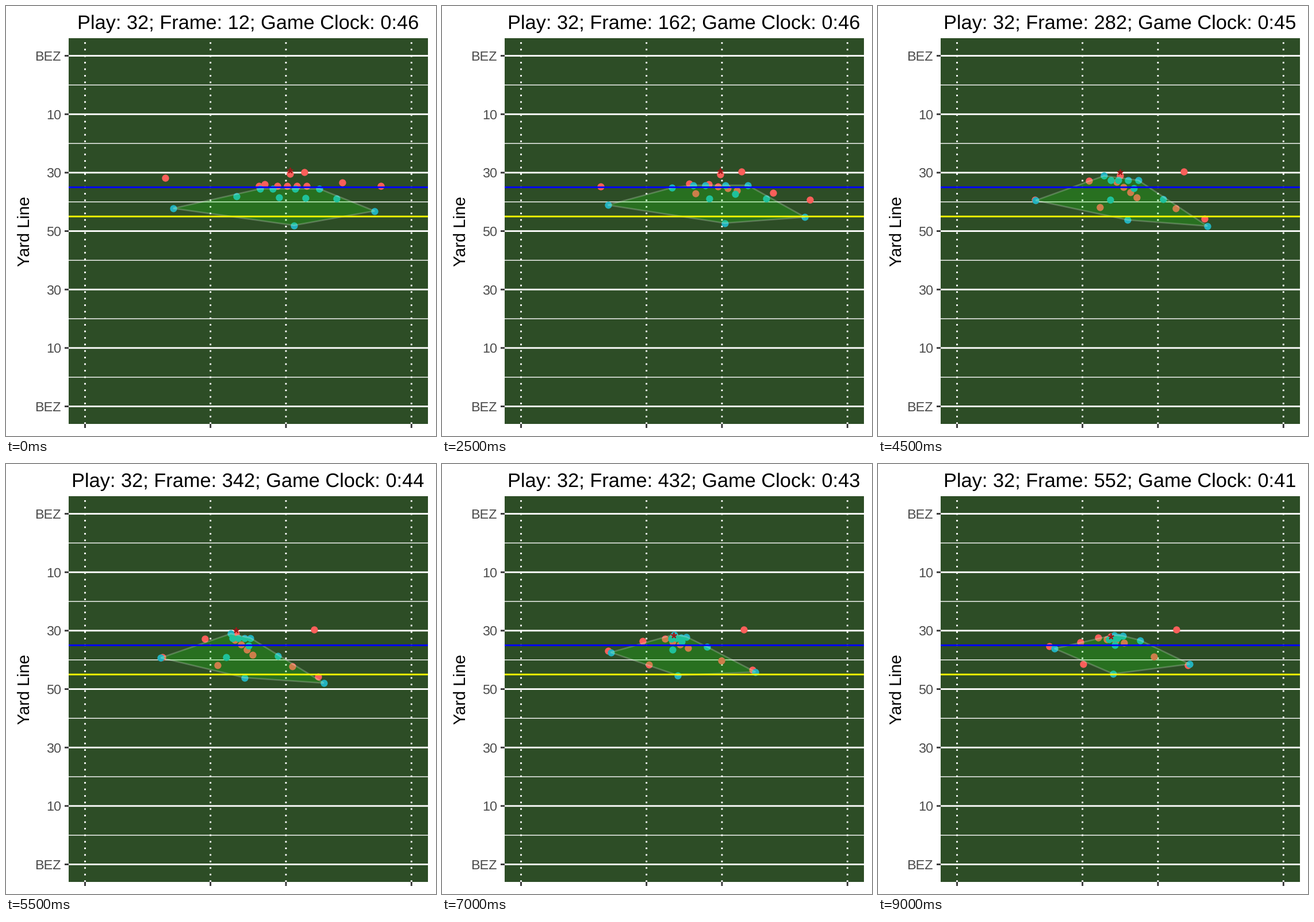
A matplotlib script that plays this animation: 748 px wide and 748 px high, repeating every 9500 ms.

```python
import numpy as np
import matplotlib.pyplot as plt
from matplotlib.animation import FuncAnimation

SIZE, DPI = 748, 100
PX = 72 / DPI
STEPS, STEP_MS = 19, 500
LEFT, RIGHT, TOP, BOTTOM = 109, 734, 56, 727
GOAL, TEN_YARDS = 86.6, 50.825
FIELD, RED, TEAL = "#2d4d26", "#fa5f5a", "#22b2be"

plt.rcParams.update({"font.family": "Liberation Sans", "text.hinting": "none"})
fig = plt.figure(figsize=(SIZE / DPI, SIZE / DPI), dpi=DPI, facecolor="white")
ax = fig.add_axes([0, 0, 1, 1])
ax.set(xlim=(0, SIZE), ylim=(SIZE, 0))
ax.axis("off")

steps = np.arange(STEPS)


def ease(start, stop):
    u = np.clip((steps - start) / (stop - start), 0, 1)
    return u * u * (3 - 2 * u)


# The depth of a run changes a little earlier than its width
BREAK = np.stack([ease(3.3, 11.7), ease(1.5, 9.5)], axis=1)
SETTLE = np.stack([ease(11, 16), ease(10, 17)], axis=1)


def run(start, mid, end):
    """Positions at every step: formation, break to mid, settle at end."""
    a, b, c = np.array([start, mid, end], float)
    return a + (b - a) * BREAK + (c - b) * SETTLE


def hull(points):
    """Convex hull by monotone chain."""
    def chain(seq):
        out = []
        for x, y in seq:
            while len(out) > 1:
                (px, py), (qx, qy) = out[-2:]
                if (qx - px) * (y - py) - (qy - py) * (x - px) > 0:
                    break
                out.pop()
            out.append((x, y))
        return out[:-1]

    pts = sorted(map(tuple, points))
    return chain(pts) + chain(pts[::-1])


def line(xs, ys, color, width, z=1, **kw):
    ax.plot(xs, ys, color=color, lw=width * PX, zorder=z, snap=False,
            solid_capstyle="butt", dash_capstyle="butt", **kw)


quarterback = run((494, 292), (398, 295), (405, 300))
ball_path = quarterback + np.outer(6 * ease(11, 14) - 6, (0, 1))

offense = [
    run((277, 299), (272, 337), (298, 317)),    # wide left
    run((652, 313), (541, 371), (539, 350)),    # wide right
    run((585, 306.5), (496, 353), (480, 335)),  # slot
    run((519, 288.5), (536, 287.5), (519, 288)),  # back
    run((440, 313), (344, 304), (352, 310)),    # left tackle
    run((450, 309.5), (366, 350), (357, 348)),  # tight end
]
offense += [run((472 + 17 * k, 313), (397 + 10 * k, 306 + 9 * k),
                (383 + 15 * k, 302 + 3 * k)) for k in range(4)]
offense = np.stack(offense + [quarterback], axis=1)

defense = [
    run((291, 352), (269, 338), (307, 321)),      # left corner
    run((641, 356.5), (551, 383), (542, 348)),    # right corner
    run((501, 381.5), (413, 372), (409, 365)),    # safety
    run((575, 334.5), (471, 336), (456, 306.5)),  # nickel
    run((401, 330.5), (391, 295), (411, 297.5)),  # blitzer
    run((475, 333), (381, 337), (412, 314.5)),    # left backer
    run((521, 334), (420, 317), (416, 303)),      # right backer
]
defense += [run((x, 318), (393 + 10 * k, 303), (402 + 8 * k, 305 - 2 * k))
            for k, x in enumerate((442, 464, 503, 545))]
defense = np.stack(defense, axis=1)

# Field and axes
ax.add_patch(plt.Rectangle((LEFT, TOP), RIGHT - LEFT, BOTTOM - TOP,
                           fc=FIELD, lw=0, zorder=0))
for k, label in enumerate(["BEZ", "10", "30", "50", "30", "10", "BEZ"]):
    y = GOAL + 2 * TEN_YARDS * k
    line([LEFT, RIGHT], [y, y], "white", 2.85)
    line([102, LEFT], [y, y], "#333333", 2.85)
    ax.text(96, y + 8.2, label, size=23.4 * PX, color="#4d4d4d",
            ha="right", va="baseline")
    if k < 6:
        line([LEFT, RIGHT], [y + TEN_YARDS] * 2, "white", 1.42)
for x in (137.5, 355.7, 487, 705.3):
    line([x, x], [BOTTOM, TOP], "white", 2.85, 1.5, ls=(0, (1, 3)))
    line([x, x], [BOTTOM, 734], "#333333", 2.85)
for tens, color in ((4.5, "#0000ff"), (5.5, "#ffff00")):
    line([LEFT, RIGHT], [GOAL + tens * TEN_YARDS] * 2, color, 2.85, 5.5)
ax.text(40.5, 391.5, "Yard Line", size=29 * PX, rotation=90,
        rotation_mode="anchor", ha="center", va="baseline")

title = ax.text(421, 39.5, "", size=34.4 * PX, ha="center", va="baseline")
dot = dict(s=(12.3 * PX) ** 2, lw=0)
reds = ax.scatter([], [], color=RED, zorder=3, **dot)
teals = ax.scatter([], [], color=TEAL, zorder=4, **dot)
area = ax.add_patch(plt.Polygon([(0, 0)] * 3, fc=(0.08, 1, 0.04, 0.2),
                                ec=(1, 1, 1, 0.22), lw=2.7 * PX, zorder=5))
ball, = ax.plot([], [], ls="", marker=(5, 2, 0), ms=10 * PX,
                mec="#981a1a", mew=2 * PX, zorder=6)


def clock(i):
    if i == 7:
        return "-1:-1"
    return f"0:{46 - max(0, (i - 7) // 2)}"


def draw(i):
    title.set_text(f"Play: 32; Frame: {12 + 30 * i}; Game Clock: {clock(i)}")
    reds.set_offsets(offense[i])
    teals.set_offsets(defense[i])
    area.set_xy(hull(defense[i]))
    ball.set_data(*ball_path[i][:, None])
    return title, reds, teals, area, ball


anim = FuncAnimation(fig, draw, frames=STEPS, interval=STEP_MS,
                     repeat=True, repeat_delay=0)
plt.show()
```
